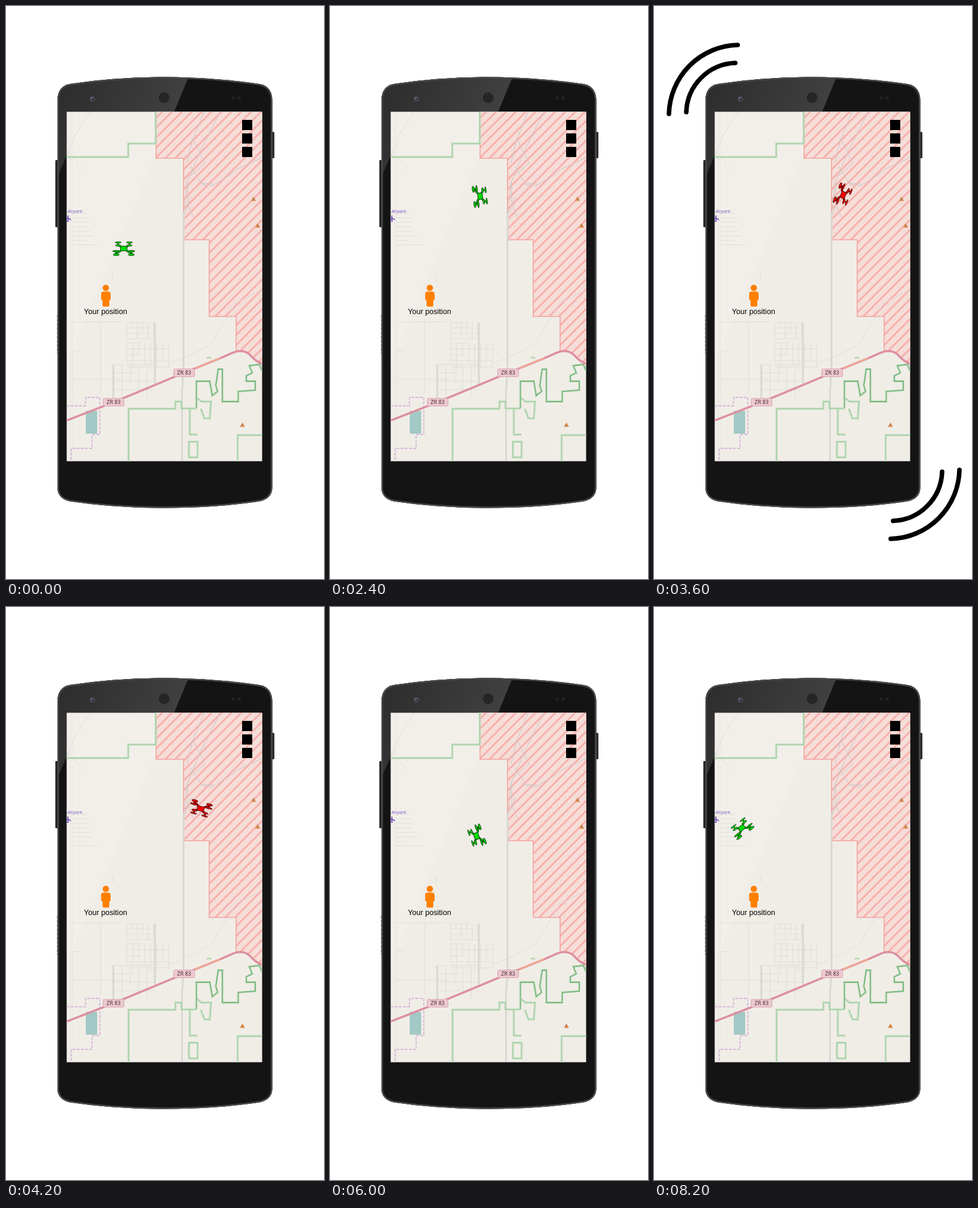
An HTML page for the animation above (8400 ms loop, 532 by 956 pixels).

```html
<!DOCTYPE html>
<html lang="en">
<head>
<meta charset="utf-8">
<title>Drone geofence alert</title>
<style>
  html, body { margin: 0; width: 100%; height: 100%; overflow: hidden; background: #fff; }
  svg { display: block; width: 100%; height: 100%; }
  .line { fill: none; }
  .street { fill: none; stroke: #dbd9d6; stroke-width: .8; }
  .track { fill: none; stroke: #cbc6c5; stroke-width: 1; }
  .park { fill: none; stroke: #a3cfa2; stroke-width: 1.5; }
  .park.strong { stroke: #76b67a; stroke-width: 1.8; }
  .halo { fill: none; stroke: #c3dfc0; stroke-width: 4; opacity: .7; }
  .shield rect { fill: #ecc8d0; stroke: #d9a8b3; }
  .shield text { font: 500 9px "Noto Sans", "Open Sans", sans-serif; fill: #4d2933; text-anchor: middle; }
</style>
</head>
<body>
<svg viewBox="0 0 532 956" xmlns="http://www.w3.org/2000/svg">
  <defs>
    <pattern id="hatch" width="11.7" height="11.7" patternUnits="userSpaceOnUse" patternTransform="rotate(45)">
      <rect width="11.7" height="11.7" fill="#f5ddd8"/>
      <rect x="4" width="2.6" height="11.7" fill="#f9aaa6"/>
    </pattern>
    <pattern id="basin" width="3" height="3" patternUnits="userSpaceOnUse">
      <rect width="3" height="3" fill="#a5cbc8"/>
      <rect width="1" height="1" fill="#8fb9b5"/>
    </pattern>
    <pattern id="mesh" width="3" height="3" patternUnits="userSpaceOnUse" patternTransform="rotate(20)">
      <rect width="3" height="3" fill="#161616"/>
      <circle cx="1.5" cy="1.5" r=".9" fill="#4a4a4a"/>
    </pattern>
    <linearGradient id="gloss" x1="0" y1="0" x2="1" y2=".35">
      <stop offset="0" stop-color="#2b2b2b"/>
      <stop offset="1" stop-color="#424242"/>
    </linearGradient>
    <path id="body" d="M86 158Q86 134 107 130Q180 119 265 118.500Q350 119 424 130Q445.500 134 445.500 158V803Q445.500 822 424 826.500Q350 837.500 265 837.500Q180 837.500 107 826.500Q86 822 86 803Z"/>
    <clipPath id="bodyClip"><use href="#body"/></clipPath>
    <clipPath id="screen"><rect x="101.500" y="176.500" width="327" height="583"/></clipPath>
    <g id="warn">
      <path d="M0-3.600L3.800 3H-3.800Z" fill="#e59a5c" stroke="#cf7f3e" stroke-width=".6"/>
      <path d="M0-1.400V1.800" stroke="#7a4a20" stroke-width=".9"/>
    </g>
    <g id="rotor" stroke="#000" stroke-width=".7">
      <path d="M-1.200-3H1.200V3H-1.200Z"/>
      <ellipse cy="-3" rx="6" ry="1.300"/>
      <ellipse cy="2.800" rx="5.200" ry="1.700"/>
    </g>
    <path id="arms" d="M-9-6L9 6M9-6L-9 6M-12 7H-9M12 7H9"/>
  </defs>

  <rect width="532" height="956" fill="#fff"/>

  <!-- phone -->
  <rect x="82.500" y="257" width="6" height="112" rx="1.500" fill="#242424"/>
  <rect x="442" y="210" width="7" height="44" rx="1.500" fill="#2c2c2c"/>
  <path d="M85.500 515V580" class="line" stroke="#555" stroke-dasharray="5 2" opacity=".6"/>
  <use href="#body" fill="#141414"/>
  <g clip-path="url(#bodyClip)">
    <path d="M80 110H309L281 177H101V250L80 300Z" fill="url(#gloss)"/>
    <use href="#body" fill="none" stroke="#444" stroke-width="5"/>
    <use href="#body" fill="none" stroke="#555" stroke-width="1.500"/>
  </g>
  <circle cx="144.500" cy="155" r="4.300" fill="#55565f"/>
  <circle cx="144.500" cy="155" r="2.500" fill="#22232f"/>
  <circle cx="143.800" cy="154.300" r="1.100" fill="#a9aac8"/>
  <circle cx="264.500" cy="153" r="9" fill="url(#mesh)"/>
  <circle cx="380" cy="153.500" r="3" fill="#222"/>
  <circle cx="390" cy="153.500" r="3" fill="#222"/>

  <g clip-path="url(#screen)">
    <rect x="101" y="176" width="328" height="584" fill="#f0ede7"/>
    <path d="M101 176H281L101 599Z" fill="#fff" opacity=".1"/>

    <!-- restricted zone -->
    <path d="M251 170V254H297V390H340V518H385V576Q404 574 411 585T435 598V170Z" fill="url(#hatch)" stroke="#f6a29e" stroke-width="1.600"/>

    <path class="street" id="streets"/>
    <path class="street" d="M140 177L116 215L102 250M101 240L130 272M178 448V460M270 597Q330 575 345 560L385 495L428 474"/>
    <path class="track" d="M331 177L313 222L333 262L309 283M358 177L327 238L303 294L297 350M312 222L303 262M309 268L328 298L345 300L376 281L387 272L428 253M347 297L327 296M304 294V330L313 352M297 350L310 318"/>

    <path class="line" d="M109.500 177V759" stroke="#dcd8d6" stroke-width="2"/>
    <path class="line" d="M109.500 177V759" stroke="#f8f5f2"/>
    <path class="line" id="lanes" d="M297 345V604L294.500 645V759M179.500 598V655M249 528V632" stroke="#dad8d5" stroke-width="2.800"/>
    <use href="#lanes" style="stroke:#fff;stroke-width:1.800"/>

    <g id="parks"></g>

    <path class="line" d="M101 667H133V653H157V715H144V738H109V762" stroke="#cfaad5" stroke-width="1.400" stroke-dasharray="5 2"/>
    <rect x="134" y="676" width="18" height="37" fill="url(#basin)" stroke="#93bdb9" stroke-width=".7"/>

    <!-- highway -->
    <path id="road" class="line" d="M98 693L180 661L298 612L360 587L378 579Q396 571 408 582Q418 594 432 598" stroke="#dd8fa0" stroke-width="3.300"/>
    <use href="#road" style="stroke:#e9a0af;stroke-width:2"/>
    <path class="line" d="M316 604.500L358 587.600" stroke="#f3ab92" stroke-width="2.400"/>
    <path class="line" d="M336 588Q339 584 343 588" stroke="#a8cf9f" stroke-width="2"/>
    <g class="shield" transform="translate(180 661)">
      <rect x="-17.500" y="-6.500" width="35" height="13" rx="2"/><text y="3.300">ZR 83</text>
    </g>
    <g class="shield" transform="translate(298 612)">
      <rect x="-17.500" y="-6.500" width="35" height="13" rx="2"/><text y="3.300">ZR 83</text>
    </g>

    <text x="103" y="345" fill="#7f5ac8" style="font:italic 7.500px 'Noto Sans','Open Sans',sans-serif">Airpark</text>
    <path d="M103.500 349Q104.500 349 104.500 351V353L109 356V357.500L104.500 356V358.500L106 360H101L102.500 358.500V356L98 357.500V356L102.500 353V351Q102.500 349 103.500 349Z" fill="#8461c4"/>
    <use href="#warn" x="414" y="322"/>
    <use href="#warn" x="421" y="366.500"/>
    <use href="#warn" x="395.500" y="699"/>
  </g>

  <path d="M395 190h17v17h-17zM395 212.500h17v17h-17zM395 235h17v17h-17z"/>

  <!-- person -->
  <g fill="#ff7f00">
    <circle cx="167" cy="470.300" r="5.300"/>
    <path d="M163 476.500H171Q175 476.500 175 480.500V489Q175 491 172.800 491V499Q172.800 501.500 170.300 501.500H164Q161.500 501.500 161.500 499V491Q159.200 491 159.200 489V480.500Q159.200 476.500 163 476.500Z"/>
  </g>
  <text x="166.500" y="514" text-anchor="middle" style="font:12.600px 'Liberation Sans',Arial,sans-serif">Your position</text>

  <g id="drone" stroke-width=".8">
    <use href="#arms" stroke="#000" stroke-width="3"/>
    <use href="#arms" stroke="currentColor" stroke-width="1.800"/>
    <path d="M-4.500-4.500H4.500L6 2L3.500 3.500H-3.500L-6 2Z" stroke="#000" stroke-width=".7"/>
    <use href="#rotor" transform="translate(-9.500 -8) scale(.87)"/>
    <use href="#rotor" transform="translate(9.500 -8) scale(.87)"/>
    <use href="#rotor" transform="translate(-12.700 7)"/>
    <use href="#rotor" transform="translate(12.700 7)"/>
  </g>

  <g id="buzz" class="line" stroke="#000" stroke-width="7.600" stroke-linecap="round">
    <path d="M25 180A118 118 0 0 1 140 65M54 177A85 85 0 0 1 136 95"/>
    <path d="M511 774A118 118 0 0 1 396 889M482 777A85 85 0 0 1 400 859"/>
  </g>
</svg>

<script>
const $ = id => document.getElementById(id);
const LOOP = 8400;

let seed = 7;
const random = () => (seed = seed * 16807 % 2147483647) / 2147483647;

// Town blocks: a grid with some streets cut short
function town(x, y, w, h, gap) {
  let d = "";
  for (let i = 0; i <= w; i += gap) d += `M${x + i} ${y}v${h * (random() < .5 ? 1 : random())}`;
  for (let j = 0; j <= h; j += gap) d += `M${x} ${y + j}h${w * (random() < .5 ? 1 : random())}`;
  return d;
}
let streets = town(202, 528, 47, 28, 9) + town(202, 562, 70, 46, 10) + town(180, 598, 69, 56, 14) + town(110, 527, 90, 120, 48);
for (let y = 346; y <= 399; y += 7.5) streets += `M110 ${y}h${15 + 32 * random()}`;
$("streets").setAttribute("d", streets);

// Park borders: a thin line over a soft halo
const park = (d, kind = "") => `<path class="halo" d="${d}"/><path class="park ${kind}" d="${d}"/>`;
$("parks").innerHTML =
  park("M98 252H204.500V229.500H250.500V172") +
  park("M205 764V672H283.500V660H293.500V671.500H318.500") +
  park("M318.500 653L327 660H343L341 688H332L326 672M307.500 672V715H320M306 727H320.500V753H306ZM432 716H387.500V764") +
  park("M318.500 671V626H341L345 650L354 643L351 633L355 606H362V660H388.500V643L417 641V626H402V617L412 612L407 600L424 598L428 608", "strong");

// Waypoints on the flight clock: time, x, y, heading in degrees
const route = [
  [0, 197, 405, 0], [1400, 212.5, 335.5, 33], [2900, 292, 316, 88], [3400, 316, 315, 112],
  [4600, 307.5, 360, 236], [5800, 245.5, 382, 250], [6800, 195, 398, 271], [7800, 147, 369, 323]
];
const SPEED = .053; // px per ms
const HOVERS = [1200, 7200]; // the drone rests for 200 ms at these times

// Smooth flight at steady speed; the drone points along its way
function pose(t) {
  const m = t - 200 * HOVERS.filter(h => t >= h).length;
  const i = Math.max(1, route.findIndex(p => p[0] >= m));
  const a = route[i - 1], b = route[i];
  const span = b[0] - a[0], u = (m - a[0]) / span, handle = SPEED * span / 3;
  const rad = deg => deg * Math.PI / 180;
  const curve = (n, dir) => {
    const p = [a[n], a[n] + handle * dir(rad(a[3])), b[n] - handle * dir(rad(b[3])), b[n]];
    const v = 1 - u;
    return {
      at: v ** 3 * p[0] + 3 * v * v * u * p[1] + 3 * v * u * u * p[2] + u ** 3 * p[3],
      slope: v * v * (p[1] - p[0]) + 2 * v * u * (p[2] - p[1]) + u * u * (p[3] - p[2])
    };
  };
  const x = curve(1, Math.sin), y = curve(2, r => -Math.cos(r));
  return [x.at, y.at, Math.atan2(x.slope, -y.slope) * 180 / Math.PI];
}

function draw(now) {
  const t = now % LOOP;
  // Finer time steps on the way into and out of the zone
  const fine = (t >= 2400 && t < 3200) || (t >= 5200 && t < 6000);
  const step = fine ? 100 : 200;
  const s = Math.floor(t / step) * step;
  const [x, y, heading] = pose(s);
  const alert = s >= 3200 && s < 5200;
  const color = alert ? "#f00" : "#0d0";
  const drone = $("drone");
  drone.setAttribute("transform", `translate(${x} ${y}) rotate(${heading})`);
  drone.setAttribute("fill", color);
  drone.setAttribute("color", color);
  $("buzz").style.display = alert && (s - 3200) % 400 < 200 ? "" : "none";
}

const start = performance.now();
function tick() {
  draw(performance.now() - start);
  requestAnimationFrame(tick);
}
tick();
</script>
</body>
</html>
```
